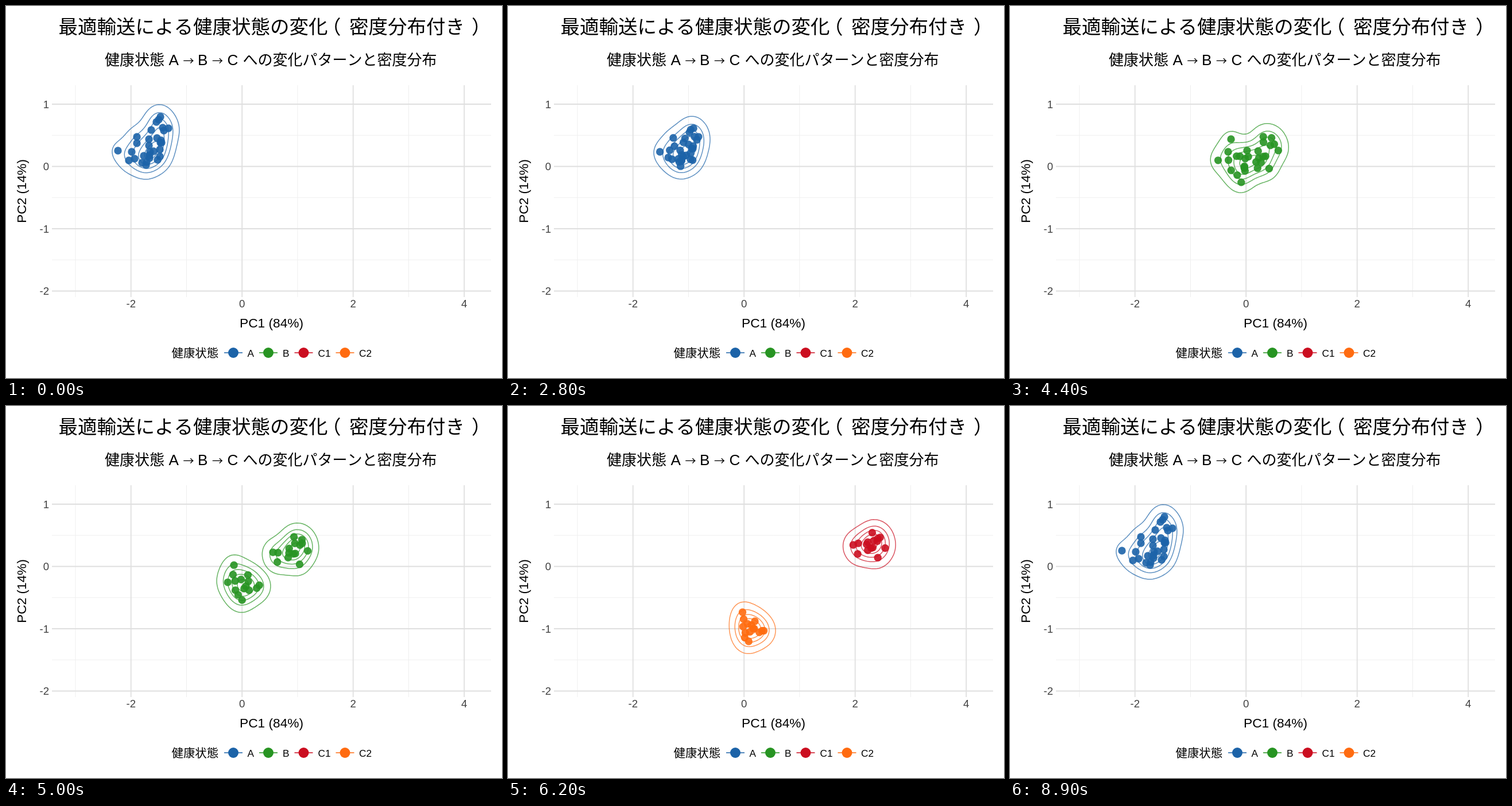
An HTML page with a canvas that plays this animation: 864x648 px, repeating every 9000 ms.

```html
<!DOCTYPE html>
<html lang="ja">
<head>
<meta charset="utf-8">
<style>
  html, body { margin: 0; overflow: hidden; background: #fff; }
  canvas { display: block; }
</style>
</head>
<body>
<canvas id="stage" width="864" height="648"></canvas>
<script>
const ctx = document.getElementById('stage').getContext('2d');
const SANS = '"Liberation Sans", Arial, sans-serif';
const CJK = '"Noto Sans CJK JP", "Noto Sans CJK", sans-serif';
const COLORS = { A: '#1c63a8', B: '#279422', C1: '#cb0e20', C2: '#ff6b10' };
const LOOP = 9000, STEP = 100, HOLD = 20, SEGMENT = 12, STEPS = 48, RESET = 8900;
const UNIT_X = 96.75, UNIT_Y = 108.5, BANDWIDTH = 0.15, CELL = 3;
const LEVELS = [0.1, 0.3, 0.5, 0.7, 0.9];

const pairs = list => Array.from({ length: list.length / 2 }, (_, i) => [list[2 * i], list[2 * i + 1]]);
const mean = (points, axis) => points.reduce((sum, p) => sum + p[axis], 0) / points.length;

// Places points around a centre by weighting their offsets in two other poses
function blend(center, a, b, weightA, weightB) {
  return a.map((p, i) => [0, 1].map(k =>
    center[k] + weightA[k] * (p[k] - mean(a, k)) + weightB[k] * (b[i][k] - mean(b, k))));
}

// Five poses from the first and last one and the centres between
function poses({ first, last, centers, pullFirst, pullLast }) {
  const start = pairs(first), end = pairs(last);
  const middle = blend(centers[1], start, end, pullFirst, pullLast);
  const early = blend(centers[0], start, middle, [0.33, 0.4], [0.33, 0.4]);
  const late = blend(centers[2], start, end, [0, 0], [0.95, 0.85]);
  return [start, early, middle, late, end];
}

const upper = poses({
  first: [249,243, 251,254, 266,198, 250,265, 268,250, 263,230, 262,202, 273,212, 257,253, 269,238,
          283,213, 271,238, 268,262, 269,193, 275,217],
  last: [673,236, 682,233, 707,213, 681,253, 697,235, 699,231, 710,228, 716,229, 699,246, 705,242,
         717,224, 708,241, 717,260, 721,222, 730,242],
  centers: [[343, 248.5], [438, 255.7], [559.2, 247.6]],
  pullFirst: [0.6, 0.5], pullLast: [0.9, 0.5]
});
const lower = poses({
  first: [195,252, 219,254, 228,228, 228,239, 214,269, 224,266, 249,232, 250,260, 240,261, 244,277,
          245,272, 253,216, 237,273, 264,268, 270,234],
  last: [409,423, 410,409, 408,396, 424,420, 417,418, 413,435, 430,413, 421,433, 412,444, 419,451,
         427,427, 429,427, 438,434, 443,431, 446,431],
  centers: [[326, 257], [400.6, 272.7], [423.4, 348]],
  pullFirst: [0.7, 0.3], pullLast: [0.6, 1.1]
});

function text(str, x, y, size, font = SANS, align = 'left', color = '#000') {
  ctx.font = `${size}px ${font}`;
  ctx.textAlign = align;
  ctx.fillStyle = color;
  ctx.fillText(str, x, y);
}

function line(x1, y1, x2, y2, color, width) {
  ctx.strokeStyle = color;
  ctx.lineWidth = width;
  ctx.beginPath();
  ctx.moveTo(x1, y1);
  ctx.lineTo(x2, y2);
  ctx.stroke();
}

function dot(x, y, r, color) {
  ctx.fillStyle = color;
  ctx.beginPath();
  ctx.arc(x, y, r, 0, 2 * Math.PI);
  ctx.fill();
}

function drawChart() {
  const px = v => 411.2 + v * UNIT_X, py = v => 279.5 - v * UNIT_Y;
  const vertical = (v, c, w) => line(px(v), 138, px(v), 507, c, w);
  const horizontal = (v, c, w) => line(80, py(v), 845, py(v), c, w);
  [-3, -1, 1, 3].forEach(v => vertical(v, '#efefef', 1));
  [0.5, -0.5, -1.5].forEach(v => horizontal(v, '#efefef', 1));
  [-2, 0, 2, 4].forEach(v => {
    vertical(v, '#dfdfdf', 1.8);
    text(v, px(v), 525, 18.6, SANS, 'center', '#404040');
  });
  [1, 0, -1, -2].forEach(v => {
    horizontal(v, '#dfdfdf', 1.8);
    text(v, 75, py(v) + 6.5, 18.6, SANS, 'right', '#404040');
  });

  text('最適輸送による健康状態の変化', 91.5, 48, 33.5, CJK);
  text('（', 550, 48, 33.5, CJK);
  text('密度分布付き', 598, 48, 33.5, CJK);
  text('）', 811, 48, 33.5, CJK);

  text('健康状態', 172, 102.5, 26, CJK);
  text('A', 283.5, 102.5, 26);
  text('→', 318, 103, 19, CJK, 'center');
  text('B', 334, 102.5, 26);
  text('→', 368.5, 103, 19, CJK, 'center');
  text('C', 385.5, 102.5, 26);
  text('への変化パターンと密度分布', 412.5, 102.5, 26, CJK);

  text('PC1 (84%)', 462.5, 560, 22.7, SANS, 'center');
  ctx.save();
  ctx.translate(35, 322.5);
  ctx.rotate(-Math.PI / 2);
  text('PC2 (14%)', 0, 0, 22.7, SANS, 'center');
  ctx.restore();

  text('健康状態', 288.5, 611.5, 20.4, CJK);
  [['A', 396, 420.5], ['B', 457, 482], ['C1', 518.5, 543.5], ['C2', 590.5, 615]].forEach(([name, x, labelX]) => {
    line(x - 16, 604, x + 16, 604, COLORS[name], 1.5);
    dot(x, 604, 9, COLORS[name]);
    text(name, labelX, 610.5, 17.2);
  });
}

function densityGrid(points) {
  const xs = points.map(p => p[0]), ys = points.map(p => p[1]);
  const x0 = Math.min(...xs) - 48, y0 = Math.min(...ys) - 48;
  const cols = Math.ceil((Math.max(...xs) + 48 - x0) / CELL);
  const rows = Math.ceil((Math.max(...ys) + 48 - y0) / CELL);
  const sx = BANDWIDTH * UNIT_X, sy = BANDWIDTH * UNIT_Y;
  const grid = [];
  let peak = 0;
  for (let j = 0; j <= rows; j++) {
    for (let i = 0; i <= cols; i++) {
      const x = x0 + i * CELL, y = y0 + j * CELL;
      const z = points.reduce((sum, p) =>
        sum + Math.exp(-(((x - p[0]) / sx) ** 2 + ((y - p[1]) / sy) ** 2) / 2), 0);
      grid.push([x, y, z]);
      peak = Math.max(peak, z);
    }
  }
  return { grid, cols, rows, peak };
}

// Marching squares over the kernel density
function drawContours(points, color) {
  const { grid, cols, rows, peak } = densityGrid(points);
  ctx.beginPath();
  for (let j = 0; j < rows; j++) {
    for (let i = 0; i < cols; i++) {
      const k = j * (cols + 1) + i;
      const corners = [grid[k], grid[k + 1], grid[k + cols + 2], grid[k + cols + 1]];
      for (const level of LEVELS) {
        const z = level * peak, cuts = [];
        corners.forEach((a, n) => {
          const b = corners[(n + 1) % 4];
          if ((a[2] < z) === (b[2] < z)) return;
          const f = (z - a[2]) / (b[2] - a[2]);
          cuts.push([a[0] + f * (b[0] - a[0]), a[1] + f * (b[1] - a[1])]);
        });
        for (let n = 0; n < cuts.length; n += 2) {
          ctx.moveTo(...cuts[n]);
          ctx.lineTo(...cuts[n + 1]);
        }
      }
    }
  }
  ctx.strokeStyle = color;
  ctx.lineWidth = 1.5;
  ctx.lineCap = 'round';
  ctx.globalAlpha = 0.7;
  ctx.stroke();
  ctx.globalAlpha = 1;
  ctx.lineCap = 'butt';
}

function pointsAt(path, step) {
  const n = Math.min(Math.floor(step / SEGMENT), path.length - 2);
  const f = step / SEGMENT - n;
  return path[n].map((p, i) => p.map((v, k) => v + f * (path[n + 1][i][k] - v)));
}

function draw(step) {
  ctx.fillStyle = '#fff';
  ctx.fillRect(0, 0, 864, 648);
  drawChart();
  const split = [upper, lower].map(path => pointsAt(path, step));
  const groups = step <= 24 ? [split.flat()] : split;
  const states = step < 12 ? ['A'] : step < 36 ? ['B', 'B'] : ['C1', 'C2'];
  groups.forEach((group, i) => drawContours(group, COLORS[states[i]]));
  ctx.globalAlpha = 0.9;
  groups.forEach((group, i) => group.forEach(([x, y]) => dot(x, y, 6.7, COLORS[states[i]])));
  ctx.globalAlpha = 1;
}

let shown = -1;
function tick() {
  const t = performance.now() % LOOP;
  const step = t >= RESET ? 0 : Math.max(0, Math.min(STEPS, Math.floor(t / STEP) - HOLD));
  if (step !== shown) draw(shown = step);
  requestAnimationFrame(tick);
}
tick();
</script>
</body>
</html>
```
